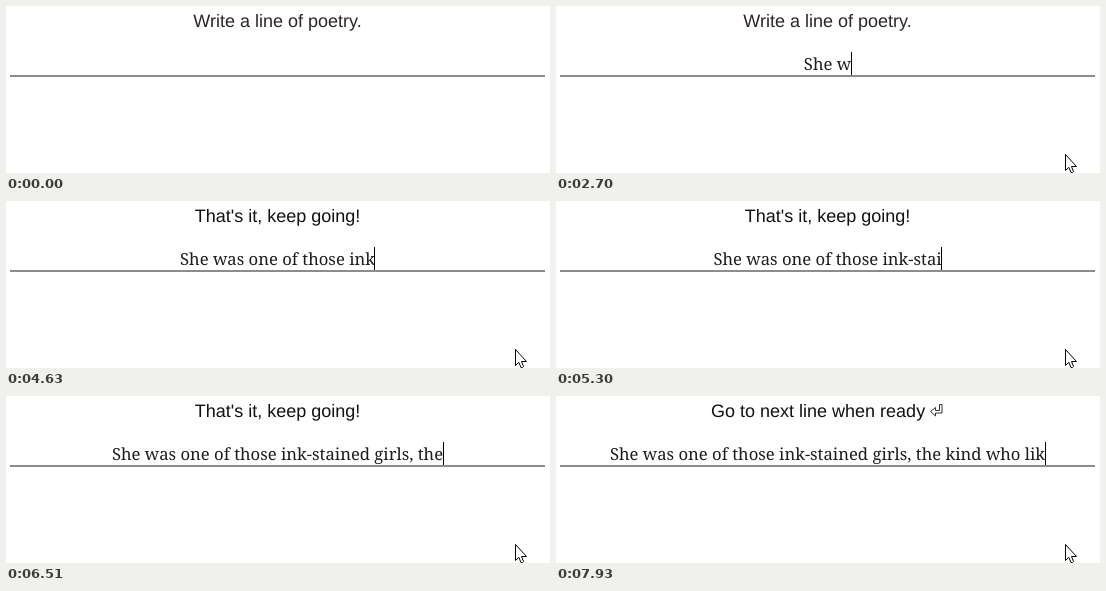
Animation, 544 px wide and 167 px high, one loop 8 s. Source, as an HTML page with a canvas:

```html
<!DOCTYPE html>
<html lang="en">
<head>
<meta charset="utf-8">
<title>Line of poetry</title>
<style>
  html, body { margin: 0; width: 100%; height: 100%; overflow: hidden; background: #fff; }
  canvas { display: block; width: 544px; height: 167px; }
</style>
</head>
<body>
<canvas id="stage"></canvas>
<script>
const W = 544, H = 167, LOOP = 8000, CENTER = 271.5;
const canvas = document.getElementById('stage');
const ctx = canvas.getContext('2d');
const dpr = window.devicePixelRatio || 1;
canvas.width = W * dpr;
canvas.height = H * dpr;

const SANS = '18px "Liberation Sans", Arial, sans-serif';
const SERIF = '16.68px "Noto Serif", serif';
const BLINK = 530, CLICK = 770;

// Bursts of typing: text, time of first key, time of last key
const bursts = [
  ['S', 2230, 2230],
  ['he was one', 2430, 3110],
  [' of ', 3240, 3440],
  ['those ', 3700, 4100],
  ['ink', 4430, 4630],
  ['-', 4830, 4830],
  ['stained gi', 5030, 5770],
  ['rls, the ', 5840, 6580],
  ['k', 6650, 6650],
  ['ind ', 6850, 7060],
  ['who lik', 7390, 7930]
];
const keys = bursts.flatMap(([text, from, to]) =>
  [...text].map((char, i) => ({
    char,
    time: from + (to - from) * i / Math.max(1, text.length - 1)
  })));

const arrow = new Path2D('M.5 .5V16.5L3.8 13.3L6 18.5H7.5L8.5 17.5L6.5 12.5H11.5Z');
const enter = new Path2D('M383.5 8.5H386V17H379.5V20L374.5 15.5L379.5 11.5V14.5H383.5Z');

const ease = p => p * p * (3 - 2 * p);
const progress = (t, from, to) => ease(Math.min(1, Math.max(0, (t - from) / (to - from))));
const mix = (a, b, p) => Math.round(a + (b - a) * p);

function drawPrompt(count) {
  ctx.font = SANS;
  ctx.textAlign = 'center';
  ctx.fillStyle = count < 20 ? '#2e2424' : '#111';
  if (count < 20) {
    ctx.fillText('Write a line of poetry.', CENTER, 21);
  } else if (count < 45) {
    ctx.fillText("That's it, keep going!", CENTER, 21);
  } else {
    ctx.textAlign = 'left';
    ctx.fillText('Go to next line when ready', 155, 21);
    ctx.strokeStyle = '#222';
    ctx.lineWidth = .9;
    ctx.stroke(enter);
  }
}

function drawField(t, typed) {
  ctx.fillStyle = '#8c8c8c';
  ctx.fillRect(4, 69, 535, 2);

  const text = typed.map(key => key.char).join('');
  ctx.font = SERIF;
  ctx.textAlign = 'left';
  ctx.fillStyle = '#1c1c1c';
  const width = ctx.measureText(text).width;
  const left = CENTER - width / 2;
  ctx.fillText(text, left, 64);

  const since = t - (typed.length ? typed[typed.length - 1].time : CLICK);
  if (since >= 0 && Math.floor(since / BLINK) % 2 === 0) {
    ctx.fillStyle = '#000';
    ctx.fillRect(Math.floor(left + width), 46, 1, 23);
  }
}

function drawPointer(t) {
  if (t < 130) return;
  const enterP = progress(t, 130, 550);
  const leaveP = progress(t, 750, 1290);
  const x = mix(mix(500, 288, enterP), 509, leaveP);
  const y = mix(mix(128, 52, enterP), 148, leaveP);

  ctx.save();
  ctx.translate(x, y);
  ctx.lineWidth = 1;
  ctx.strokeStyle = '#000';
  if (y < 68) {
    ctx.beginPath();
    ctx.moveTo(-2.5, -7.5);
    ctx.lineTo(3.5, -7.5);
    ctx.moveTo(.5, -7.5);
    ctx.lineTo(.5, 7.5);
    ctx.moveTo(-2.5, 7.5);
    ctx.lineTo(3.5, 7.5);
    ctx.stroke();
  } else {
    ctx.fillStyle = '#fff';
    ctx.fill(arrow);
    ctx.stroke(arrow);
  }
  ctx.restore();
}

function draw(t) {
  ctx.setTransform(dpr, 0, 0, dpr, 0, 0);
  ctx.textRendering = 'geometricPrecision';
  ctx.fillStyle = '#fff';
  ctx.fillRect(0, 0, W, H);
  const typed = keys.filter(key => key.time <= t);
  drawPrompt(typed.length);
  drawField(t, typed);
  drawPointer(t);
}

const start = performance.now();
function tick() {
  draw((performance.now() - start) % LOOP);
  requestAnimationFrame(tick);
}
tick();
</script>
</body>
</html>
```
